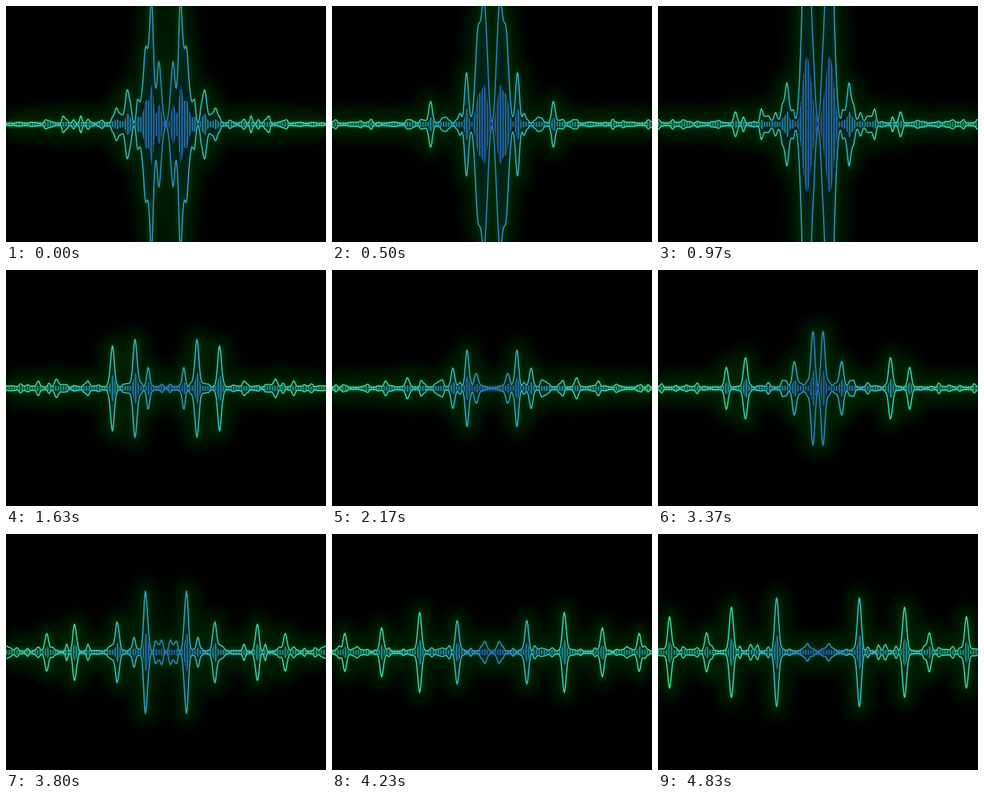
These frames come from a looping animation (496x368 px, 4860 ms). An HTML page with a canvas:

```html
<!DOCTYPE html>
<html lang="en">
<head>
<meta charset="utf-8">
<title>Sound wave</title>
<style>
  html, body { margin: 0; height: 100%; overflow: hidden; background: #000; }
  canvas { display: block; }
</style>
</head>
<body>
<canvas width="496" height="368"></canvas>
<script>
const ctx = document.querySelector('canvas').getContext('2d');
const W = 496, H = 368, CX = 248, CY = 184.5;
const LOOP = 4860, STEP = 100 / 3, LAST = 145;

// Four loud tones glide between these key points: [distance from centre, height].
const keys = [
  { step: 0, tones: [[11, 84], [23, 155], [32, 100], [60, 38]] },
  { step: 29, tones: [[14, 200], [21, 200], [47, 34], [128, 18]] },
  { step: 49, tones: [[28, 16], [48, 65], [83, 57], [170, 13]] },
  { step: 82, tones: [[22, 25], [29, 31], [37, 25], [90, 17]] },
  { step: 101, tones: [[8, 82], [37, 40], [112, 45], [142, 30]] },
  { step: 127, tones: [[54, 46], [112, 60], [171, 37], [228, 28]] },
  { step: LAST, tones: [[64, 78], [134, 66], [173, 26], [230, 46]] }
];

const mix = (a, b, u) => a + (b - a) * u;
function random(n) {
  const v = Math.sin(n * 127.1 + 11.7) * 43758.5453;
  return v - Math.floor(v);
}
function noise(x, seed) {
  const i = Math.floor(x), u = x - i;
  return mix(random(i + seed), random(i + 1 + seed), u * u * (3 - 2 * u));
}
// Spatial noise that turns into a new pattern every two steps.
function ripple(x, step) {
  const i = Math.floor(step / 2);
  return mix(noise(x, i * 97), noise(x, (i + 1) * 97), step / 2 - i);
}

function tonesAt(step) {
  const next = Math.max(1, keys.findIndex(k => k.step >= step));
  const from = keys[next - 1], to = keys[next];
  const u = (step - from.step) / (to.step - from.step);
  const unrest = Math.sin(Math.PI * u);
  return from.tones.map(([pos, height], i) => {
    const flicker = 1 + unrest * (noise(step / 2, i * 53) - 0.6) * 0.7;
    const h = mix(height, to.tones[i][1], u) * flicker;
    return { pos: mix(pos, to.tones[i][0], u), height: h, width: 2.6 + h * h / 17000 };
  });
}

function envelopeAt(step) {
  const tones = tonesAt(step);
  const loudest = Math.max(...tones.map(t => t.height));
  return Array.from({ length: W / 2 + 1 }, (_, d) => {
    const room = 12 + loudest * 0.25 * Math.exp(-((d / 75) ** 2));
    const murmur = (1 + room * ripple(d / 5.5, step) ** 2.5) * Math.min(1, d / 7);
    return tones.reduce(
      (sum, t) => sum + t.height * Math.exp(-(((d - t.pos) / t.width) ** 2) / 2), murmur);
  });
}

function sideGradient(edge, middle, near, centre) {
  const g = ctx.createLinearGradient(0, 0, W, 0);
  [[0, edge], [0.25, middle], [0.4, near], [0.5, centre]].forEach(([at, color]) => {
    g.addColorStop(at, color);
    g.addColorStop(1 - at, color);
  });
  return g;
}
const lineColor = sideGradient('#46d78f', '#40d0a8', '#3cb4bc', '#3078be');
const barColor = sideGradient('#1f8a76', '#228a8c', '#2676a0', '#24589c');

function wavePath(env, side) {
  const path = new Path2D();
  for (let x = 0; x <= W; x++) path.lineTo(x, CY + side * env[Math.abs(x - CX)]);
  return path;
}

function draw(step) {
  const env = envelopeAt(step);
  const sides = [wavePath(env, -1), wavePath(env, 1)];
  const strokeBoth = (color, width) => {
    ctx.strokeStyle = color;
    ctx.lineWidth = width;
    sides.forEach(path => ctx.stroke(path));
  };
  ctx.fillStyle = '#000';
  ctx.fillRect(0, 0, W, H);
  ctx.lineJoin = 'round';

  ctx.filter = 'blur(11px)';
  strokeBoth('#001d02', 36);
  ctx.filter = 'blur(3px)';
  strokeBoth('rgba(0, 100, 35, .4)', 5);
  ctx.filter = 'none';
  ctx.fillStyle = 'rgba(0, 42, 52, .4)';
  sides.forEach(path => ctx.fill(path));

  ctx.fillStyle = barColor;
  for (let x = 0; x < W; x++) {
    const h = Math.max(4, env[Math.abs(x - CX)] * 0.31);
    ctx.globalAlpha = x % 4 < 2 ? 1 : 0.35;
    ctx.fillRect(x, CY - h, 1, 2 * h);
  }
  ctx.globalAlpha = 1;

  strokeBoth(lineColor, 1.8);
}

let shown = -1;
function tick() {
  const t = performance.now() % LOOP;
  const step = Math.min(LAST, Math.floor((t + 3.4) / STEP));
  if (step !== shown) draw(shown = step);
  requestAnimationFrame(tick);
}
tick();
</script>
</body>
</html>
```
